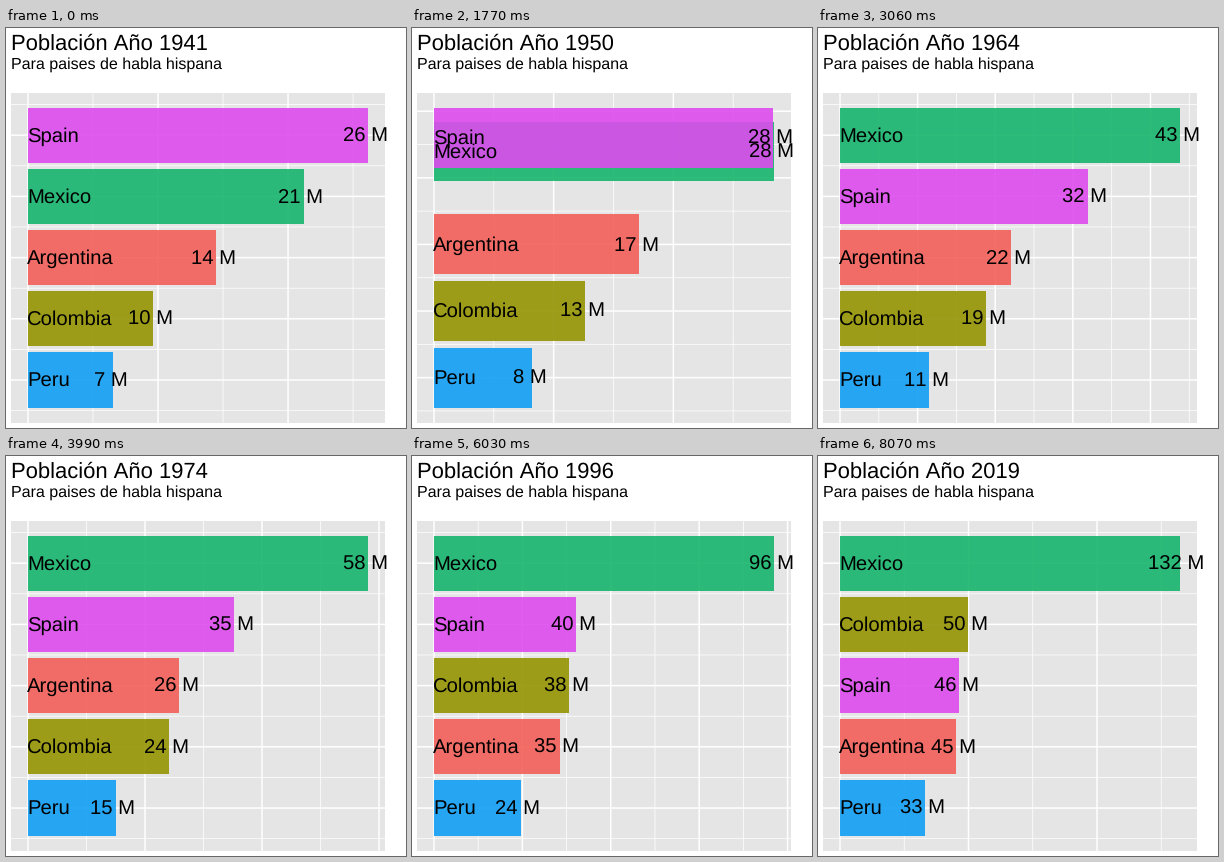
A matplotlib script that plays this animation: 400x400 px, repeating every 9 s.

```python
import numpy as np
import matplotlib
import matplotlib.pyplot as plt
from matplotlib.animation import FuncAnimation
from matplotlib.collections import LineCollection
from matplotlib.patches import Rectangle

matplotlib.rcParams["font.family"] = "Liberation Sans"
matplotlib.rcParams["text.hinting"] = "none"
matplotlib.rcParams["text.kerning_factor"] = 6   # plain advances, no kerning

SIZE, DPI = 400, 100
FRAMES, INTERVAL = 300, 30
START, BEND, END = 30, 201, 269    # the clock runs from START to END
PX = 72 / DPI                      # points per pixel
LEFT, RIGHT, TOP, BOTTOM = 5, 379, 65, 395
ZERO, SPAN_X = 22, 340             # bar origin, length of the longest bar
BARS_TOP, SPAN_Y = 79.6, 300
HALF_BAR = 0.45                    # in units of one rank
LABEL = 20.3                       # label font size in pixels

# Millions at a few key years, with steady growth in between
KEY_YEARS = 1941, 1964, 1983, 1996, 2012, 2019
COUNTRIES = {
    "Argentina": ("#f35f58", (14.46, 21.95, 29.52, 35.4, 42.2, 45.1)),
    "Colombia": ("#949403", (9.65, 18.7, 29.85, 38.0, 47.0, 49.8)),
    "Mexico": ("#16b56c", (21.2, 43.4, 74.1, 95.6, 120.8, 132.3)),
    "Peru": ("#119ef5", (6.55, 11.4, 18.8, 24.4, 30.2, 33.0)),
    "Spain": ("#dd4bef", (26.15, 31.8, 38.3, 40.0, 47.0, 46.4)),
}
LOG_POP = [np.log(pop) for _, pop in COUNTRIES.values()]


def values(year):
    return np.exp([np.interp(year, KEY_YEARS, pop) for pop in LOG_POP])


def ranks(year):
    """Place from the top; equal values share the lower place."""
    v = values(year)
    return (v[None, :] >= v[:, None]).sum(axis=1)


def tween(state, t):
    """Blend linearly between the states of two whole years."""
    year = int(t)
    p = t - year
    return (1 - p) * state(year) + p * state(year + 1)


def nice_step(top):
    """Axis step chosen by simplicity, coverage and density."""
    lo, hi = -0.05 * top, 1.05 * top
    best, choice = -9, 10
    for i, q in enumerate((1, 5, 2, 2.5, 4, 3)):
        for step in (q, 10 * q, 100 * q):
            for n in (int(hi // step), int(hi // step) + 1):
                if n < 1:
                    continue
                end = n * step
                miss = ((hi - end) ** 2 + lo ** 2) / (0.1 * (hi - lo)) ** 2
                ratio = 4 * step / (max(end, hi) - lo)
                score = (0.25 * (1 - i / 5) + 0.2 * (1 - 0.5 * miss)
                         + 0.5 * (2 - max(ratio, 1 / ratio)))
                if score > best:
                    best, choice = score, step
    return choice


fig = plt.figure(figsize=(SIZE / DPI, SIZE / DPI), dpi=DPI, facecolor="white")
ax = fig.add_axes([0, 0, 1, 1])
ax.set_xlim(0, SIZE)
ax.set_ylim(SIZE, 0)
ax.axis("off")


def write(x, y, text, size):
    return ax.text(x, y, text, size=size * PX, color="black",
                   ha="left", va="baseline", zorder=5)


def grid(width, z):
    lines = LineCollection([], colors="white", linewidths=width * PX,
                           zorder=z, capstyle="butt", snap=False)
    ax.add_collection(lines, autolim=False)
    return lines


ax.add_patch(Rectangle((LEFT, TOP), RIGHT - LEFT, BOTTOM - TOP,
                       fc="#e5e5e5", lw=0, zorder=0))
minor, major = grid(0.75, 1), grid(1.5, 2)
title = write(5, 22, "", 22)
write(5, 41, "Para paises de habla hispana", 16)

bars, names, counts = [], [], []
for name, (color, _) in COUNTRIES.items():
    bar = Rectangle((ZERO, 0), 1, 1, fc=color, alpha=0.9, lw=0, zorder=3)
    bars.append(ax.add_patch(bar))
    names.append(write(ZERO - 0.6, 0, name, LABEL))
    counts.append(write(0, 0, "", LABEL))


def draw(frame):
    t = np.interp(frame, (START, BEND, END), (1941, 1996.4, 2019))
    year = round(t)
    title.set_text(f"Población Año {year}")

    pop, place = tween(values, t), tween(ranks, t)
    top = pop.max()
    scale = SPAN_X / top
    first = place.min() - HALF_BAR
    unit = SPAN_Y / (place.max() + HALF_BAR - first)

    def y_at(rank):
        return BARS_TOP + (rank - first) * unit

    # Even half steps are major lines, odd ones minor
    lines = [], []
    half = nice_step(top) / 2
    for i in range(int(1.05 * top / half) + 1):
        x = ZERO + i * half * scale
        lines[i % 2].append([(x, TOP), (x, BOTTOM)])
    for i in range(1, 2 * len(bars) + 2):
        y = y_at(i / 2)
        if TOP < y < BOTTOM:
            lines[i % 2].append([(LEFT, y), (RIGHT, y)])
    major.set_segments(lines[0])
    minor.set_segments(lines[1])

    shown = values(year)
    for i, bar in enumerate(bars):
        length = pop[i] * scale
        upper = round(y_at(place[i] - HALF_BAR))
        lower = round(y_at(place[i] + HALF_BAR))
        bar.set_bounds(ZERO, upper, round(length), lower - upper)

        baseline = y_at(place[i]) + 6.2
        number = str(round(shown[i]))
        width = (0.556 * len(number) + 1.111) * LABEL
        names[i].set_y(baseline)
        counts[i].set_text(number + " M")
        counts[i].set_position((ZERO + length - 0.56 * width, baseline))
    return [minor, major, title, *bars, *names, *counts]


anim = FuncAnimation(fig, draw, frames=FRAMES, interval=INTERVAL,
                     init_func=lambda: draw(0), repeat=True, repeat_delay=0)
plt.show()
```
